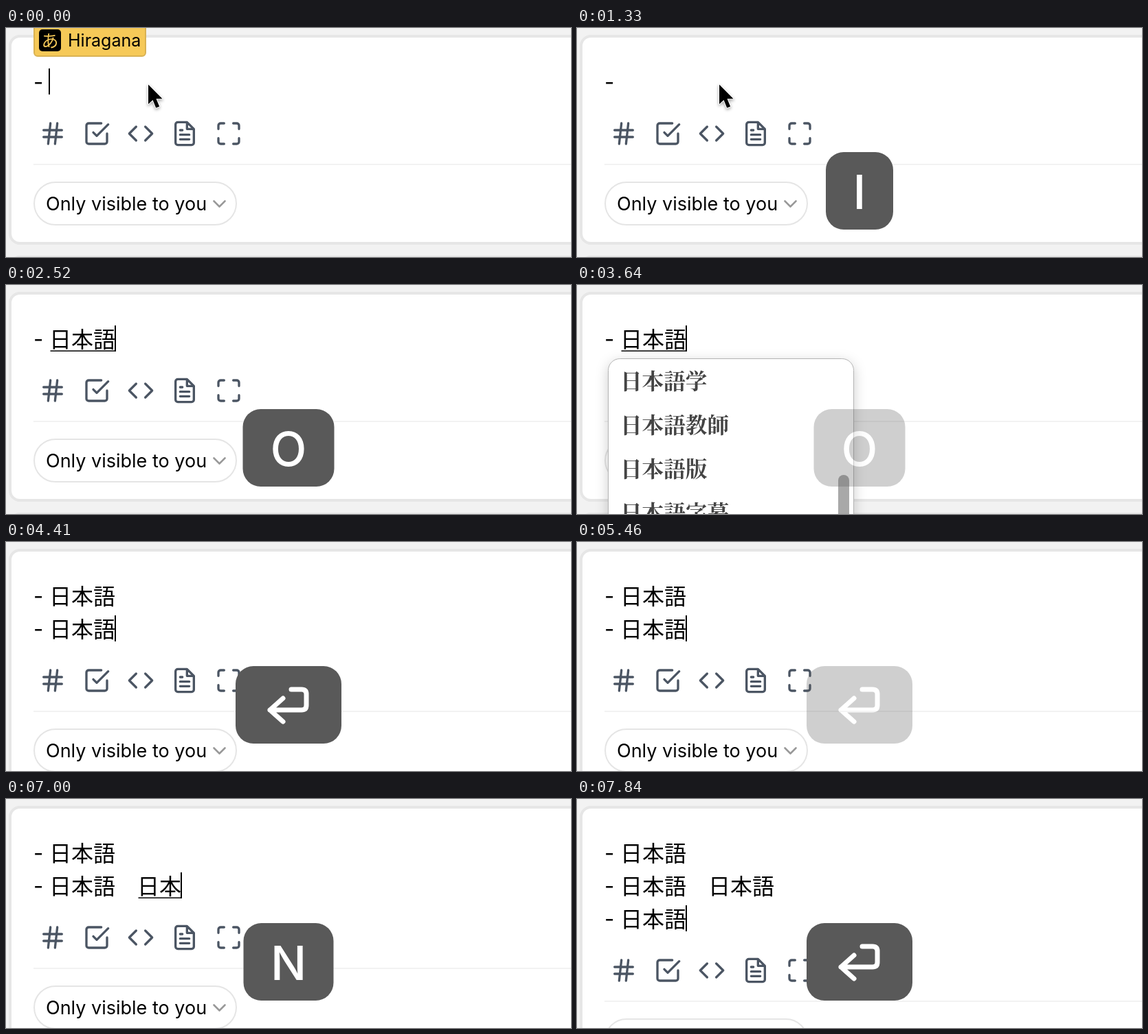
Recreate the animation shown at these times as an HTML page. Size 822 by 334 pixels, loop 8 s.

```html
<!DOCTYPE html>
<html lang="ja">
<head>
<meta charset="utf-8">
<title>List editor with IME input</title>
<style>
  html, body { margin: 0; width: 100%; height: 100%; overflow: hidden; background: #f2f2f2; }
  svg { display: block; width: 822px; height: 334px; }
  text { font-family: Inter, "Noto Sans CJK JP", "Noto Sans CJK", sans-serif; white-space: pre; }
  .card { fill: #fff; stroke: #e6e6e6; stroke-width: 4; }
  .icons { fill: none; stroke: #4b5563; stroke-width: 2; stroke-linecap: round; stroke-linejoin: round; }
  .line { font-size: 32px; }
  .dash { font-size: 31px; }
  .popup rect.panel { fill: #fff; stroke: #b4b4b4; filter: drop-shadow(0 5px 9px rgba(0, 0, 0, .2)); }
  .popup text { font: 700 31.6px "Noto Serif CJK JP", "Noto Serif JP", "Noto Sans CJK JP", "Noto Sans CJK", serif; fill: #444; }
  .key text { font-size: 69px; font-weight: 500; fill: #fff; text-anchor: middle; }
  .key path { fill: none; stroke: #fff; stroke-width: 7; stroke-linecap: round; stroke-linejoin: round; }
</style>
</head>
<body>
<svg viewBox="0 0 822 334">
  <rect width="822" height="334" fill="#f2f2f2"/>
  <rect id="card" class="card" x="6" y="12" width="900" height="302" rx="14"/>

  <g id="footer">
    <rect class="card" x="6" y="334" width="900" height="200" rx="14"/>
    <g class="icons">
      <path transform="translate(48 134) scale(1.6667)" d="M4 9H20M4 15H20M10 3 8 21M16 3 14 21"/>
      <path transform="translate(112 134) scale(1.6667)" d="M9 11l3 3L22 4M21 12v7a2 2 0 0 1-2 2H5a2 2 0 0 1-2-2V5a2 2 0 0 1 2-2h11"/>
      <path transform="translate(176 134) scale(1.6667)" d="M16 18l6-6-6-6M8 6l-6 6 6 6"/>
      <path transform="translate(240 134) scale(1.6667)" d="M14 2H6a2 2 0 0 0-2 2v16a2 2 0 0 0 2 2h12a2 2 0 0 0 2-2V8zM14 2v6h6M16 13H8M16 17H8M10 9H8"/>
      <path transform="translate(304 134) scale(1.6667)" d="M8 3H5a2 2 0 0 0-2 2v3m18 0V5a2 2 0 0 0-2-2h-3m0 18h3a2 2 0 0 0 2-2v-3M3 16v3a2 2 0 0 0 2 2h3"/>
    </g>
    <rect x="40" y="198" width="800" height="2" fill="#f2f2f2"/>
    <rect x="41" y="225" width="294" height="62" rx="31" fill="#fff" stroke="#e5e5e5" stroke-width="2"/>
    <text x="58" y="266" font-size="27">Only visible to you</text>
    <path d="M302.5 252.5l8 8 8-8" fill="none" stroke="#999" stroke-width="2.6" stroke-linecap="round" stroke-linejoin="round"/>
  </g>

  <g id="rows"></g>
  <rect id="underline" height="1.6" fill="#111"/>
  <rect id="caret" width="2" height="38"/>

  <g id="badge">
    <rect x="41" y="-20" width="162" height="61" rx="5" fill="#f6c958" stroke="#d9b253" stroke-width="2"/>
    <rect x="48" y="2" width="32" height="32" rx="5"/>
    <text x="64" y="27.5" font-size="25" text-anchor="middle" fill="#f6c958">あ</text>
    <text x="90" y="27" font-size="25">Hiragana</text>
  </g>

  <path id="pointer" d="M207 82.500v28.500l6.500-6 4.700 11.500 5-2.100-4.700-11.200h9z" stroke="#fff" stroke-width="2"
    stroke-linejoin="round" paint-order="stroke" style="filter: drop-shadow(0 2px 2px rgba(0, 0, 0, .35))"/>

  <g id="popup" class="popup">
    <rect class="panel" x="45.500" y="107.500" width="357" height="400" rx="17"/>
    <rect x="380" y="277" width="16" height="150" rx="8" fill="#a8a8a8"/>
  </g>

  <g id="key" class="key">
    <rect id="keyBox" y="181" height="113" rx="26" fill="#595959"/>
    <text id="keyText" x="411" y="264"></text>
    <path id="keyIcon"/>
  </g>
</svg>

<script>
const LOOP = 8000, TICK = 70, LINE = 48, TEXT_X = 63;
const WORD = '日本語';
const $ = id => document.getElementById(id);

// Each track lists [start time, value]; a value holds until the next one.
const lineTrack = [
  [0, ['']], [4340, [WORD]], [4410, [WORD, WORD]], [5670, [WORD, WORD + '\u3000']],
  [7770, [WORD, WORD + '\u3000' + WORD]], [7840, [WORD, WORD + '\u3000' + WORD, WORD]]
];
const draftTrack = [
  [0, ''], [1750, 'に'], [1820, 'にh'], [1890, 'にほ'], [2030, 'にほn'], [2170, '日本'],
  [2380, '日本g'], [2520, WORD], [4340, ''],
  [6230, 'n'], [6370, 'に'], [6510, 'にh'], [6650, 'にほ'], [6860, 'にほn'], [6930, '日本'],
  [7070, '日本g'], [7210, WORD], [7770, '']
];
const keyTrack = [
  [0, ''], [1190, 'N'], [1330, 'I'], [1470, 'H'], [1610, 'O'], [2030, 'N'], [2380, 'G'], [2520, 'O'],
  [3780, ''], [4270, 'enter'], [5530, ''], [5670, 'space'], [6230, 'N'], [6370, 'I'], [6510, 'H'],
  [6650, 'O'], [6860, 'N'], [7070, 'G'], [7210, 'O'], [7630, 'enter']
];
const caretTrack = [
  [0, 1], [280, 0], [770, 1], [1260, 0], [1750, 1], [3080, 0], [3570, 1],
  [4130, 0], [4340, 1], [4900, 0], [5390, 1]
];
const popupTrack = [[0, null], [2870, [0, 0]], [4340, null], [7560, [147, 60]], [7770, null]];

const keyWidth = { N: 131, I: 98, H: 131, O: 133, G: 133, space: 146, enter: 154 };
const keyIcons = {
  enter: 'M403 228l-19 17 19 17M384 245h46q7 0 7-7v-16q0-7-7-7h-15',
  space: 'M384 236v16h54v-16'
};

function at(track, t) {
  let value;
  for (const [start, v] of track) if (start <= t) value = v;
  return value;
}

const fade = (t, end, span) => Math.max(0, Math.min(1, (end - t) / span));

function set(el, attrs) {
  for (const name in attrs) el.setAttribute(name, attrs[name]);
}

function addText(parent, attrs, content = '') {
  const el = document.createElementNS('http://www.w3.org/2000/svg', 'text');
  set(el, attrs);
  el.textContent = content;
  parent.appendChild(el);
  return el;
}

const rows = [0, 1, 2].map(i => ({
  dash: addText($('rows'), { x: 40, y: 90 + i * LINE, class: 'dash' }, '-'),
  text: addText($('rows'), { x: TEXT_X, y: 91 + i * LINE, class: 'line' })
}));
['学', '教師', '版', '字幕'].forEach((end, i) =>
  addText($('popup'), { x: 63, y: 152 + i * 64 }, WORD + end));

const show = (el, on) => { el.style.display = on ? '' : 'none'; };
const width = el => el.textContent ? el.getComputedTextLength() : 0;

function drawText(t) {
  const lines = at(lineTrack, t), draft = at(draftTrack, t);
  const last = lines.length - 1, drop = last * LINE;
  rows.forEach(({ dash, text }, i) => {
    show(dash, i <= last);
    text.textContent = lines[i] || '';
  });
  const text = rows[last].text;
  const from = TEXT_X + width(text);
  text.textContent += draft;
  const to = TEXT_X + width(text);

  set($('underline'), { x: from + 1.5, y: 95.4 + drop, width: Math.max(0, to - from - 2) });
  set($('caret'), { x: Math.round(to) - 1, y: 59 + drop });
  show($('underline'), draft);
  show($('caret'), at(caretTrack, t));
  set($('card'), { height: 302 + drop });
  set($('footer'), { transform: `translate(0 ${drop})` });
}

function drawKey(t) {
  const key = at(keyTrack, t);
  show($('key'), key);
  if (!key) return;
  const w = keyWidth[key], icon = keyIcons[key];
  set($('keyBox'), { x: 411 - w / 2, width: w });
  $('keyText').textContent = icon ? '' : key;
  set($('keyIcon'), { d: icon || '' });
  const end = t >= 2520 && t < 4000 ? 3695 : t >= 4270 && t < 5600 ? 5515 : Infinity;
  set($('key'), { opacity: fade(t, end, 195) });
}

function draw(now) {
  const t = Math.floor(now % LOOP / TICK) * TICK;
  drawText(t);
  drawKey(t);
  set($('badge'), { opacity: fade(t, 1050, 350) });
  show($('pointer'), t < 1540);
  const popup = at(popupTrack, t);
  show($('popup'), popup);
  if (popup) set($('popup'), { transform: `translate(${popup})` });
}

const began = performance.now();
function loop() {
  draw(performance.now() - began);
  requestAnimationFrame(loop);
}
loop();
</script>
</body>
</html>
```
